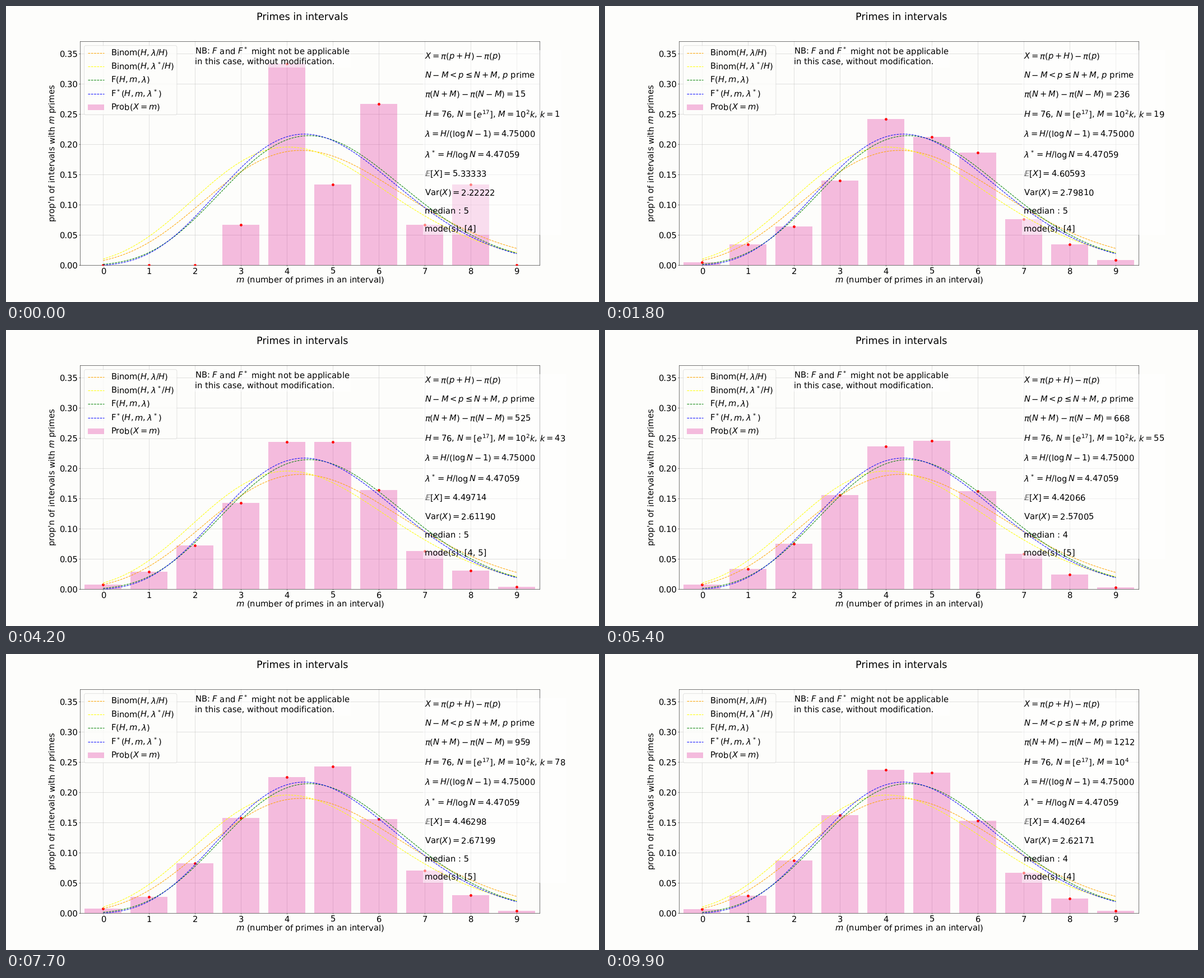
A matplotlib script that plays this animation: 1058x529 px, repeating every 10000 ms.

```python
import math

import numpy as np
import matplotlib.pyplot as plt
from matplotlib.animation import FuncAnimation
from matplotlib.lines import Line2D
from matplotlib.patches import FancyBboxPatch, Rectangle
from matplotlib.transforms import Affine2D

STAGE_W, STAGE_H = 1058, 529
STEPS = 100
PAPER = "#fdfdfb"
PINK = "#e0249a"
U = 23 / 22  # keeps point sizes in step with the 23 pt base font

# --- primes around N -------------------------------------------------------
LOG_N = 17
N = int(math.exp(LOG_N))
H = 76
LAM = H / (LOG_N - 1)
LAM_STAR = H / LOG_N


def primes_between(lo, hi):
    """All primes p with lo <= p <= hi."""
    root = math.isqrt(hi) + 1
    small = np.ones(root + 1, bool)
    small[:2] = False
    window = np.ones(hi - lo + 1, bool)
    for q in range(2, root + 1):
        if small[q]:
            small[q * q::q] = False
            window[-lo % q::q] = False
    return lo + np.flatnonzero(window)


SPAN = 100 * STEPS
PRIMES = primes_between(N - SPAN, N + SPAN + H)
FOLLOWERS = (np.searchsorted(PRIMES, PRIMES + H, "right")
             - np.searchsorted(PRIMES, PRIMES, "right"))


def sample(k):
    """Values of X for the primes within 100k of N."""
    m = 100 * k
    return FOLLOWERS[(PRIMES > N - m) & (PRIMES <= N + m)]


# --- model curves ----------------------------------------------------------
lgamma = np.vectorize(math.lgamma)
C = (math.log(H) + np.euler_gamma + math.log(2 * math.pi) - 1) / (2 * H)


def binom(m, lam):
    p = lam / H
    log_c = math.lgamma(H + 1) - lgamma(m + 1) - lgamma(H - m + 1)
    return np.exp(log_c + m * math.log(p) + (H - m) * math.log(1 - p))


def poisson(m, lam):
    return np.exp(m * math.log(lam) - lam - lgamma(m + 1))


def f_plain(m, lam):
    return poisson(m, lam) * (1 - C * ((m - lam) ** 2 - m))


def f_star(m, lam):
    return poisson(m, lam) * (1 + lam / H * (m - lam) - C * ((m - lam) ** 2 - m))


CURVES = (
    (binom, LAM, "orange", r"$\mathrm{Binom}(H, \lambda/H)$"),
    (binom, LAM_STAR, "yellow", r"$\mathrm{Binom}(H, \lambda^*/H)$"),
    (f_plain, LAM, "green", r"$\mathrm{F}(H, m, \lambda)$"),
    (f_star, LAM_STAR, "blue", r"$\mathrm{F}^*(H, m, \lambda^*)$"),
)

# --- stage -----------------------------------------------------------------
plt.rcParams.update({
    "font.family": "DejaVu Sans",
    "font.size": 23,
    "text.hinting": "none",
    "lines.linewidth": 1.5 * U,
    "lines.markersize": 6 * U,
    "axes.linewidth": 0.8 * U,
    "grid.linewidth": 0.8 * U,
    "xtick.major.size": 3.5 * U, "ytick.major.size": 3.5 * U,
    "xtick.major.pad": 3.5 * U, "ytick.major.pad": 3.5 * U,
    "xtick.major.width": 0.8 * U, "ytick.major.width": 0.8 * U,
})

fig, ax = plt.subplots(figsize=(23, 11.5), dpi=46, facecolor=PAPER)
fig.subplots_adjust(left=0.125, right=0.9, bottom=0.125, top=0.88)
fig.suptitle("Primes in intervals", fontsize=23 * 1.2)
ax.set_facecolor(PAPER)
ax.set_xlim(-0.5, 9.5)
ax.set_ylim(0, 0.37)
ax.set_xticks(range(10))
ax.set_yticks(np.arange(0, 0.36, 0.05))
ax.grid(True, alpha=0.7)

# stage pixels, measured from the top left
PX = Affine2D().scale(1 / STAGE_W, -1 / STAGE_H).translate(0, 1) + fig.transFigure


def box(x0, y0, x1, y1, **style):
    return ax.add_patch(Rectangle((x0, y0), x1 - x0, y1 - y0, transform=PX,
                                  clip_on=False, edgecolor="none", **style))


def veil(x0, y0, x1, y1):
    """Half-transparent white panel behind a block of text."""
    return box(x0, y0, x1, y1, facecolor="white", alpha=0.5, zorder=3)


def write(x, y, text="", **style):
    return ax.text(x, y, text, transform=PX, zorder=6, **style)


write(542.3, 495, "$m$ (number of primes in an interval)", ha="center")
write(88, 263.2, "prop'n of intervals with $m$ primes", ha="center",
      rotation=90, rotation_mode="anchor")

# --- bars and curves -------------------------------------------------------
values = np.arange(10)
bars = ax.bar(values, np.zeros(10), 0.8, color=PINK, alpha=0.3, zorder=2.5)
dots, = ax.plot(values, np.zeros(10), "o", color="red", zorder=2.6)

xs = np.linspace(0, 9, 400)
for curve, lam, color, _ in CURVES:
    ax.plot(xs, curve(xs, lam), "--", color=color, zorder=4)

# --- legend ----------------------------------------------------------------
ax.add_patch(FancyBboxPatch(
    (142.5, 73.7), 159.5, 118, boxstyle="round,pad=2.94", transform=PX,
    facecolor=PAPER, edgecolor="0.8", alpha=0.8, linewidth=U, zorder=5))
ROW = 24.4
for i, (_, _, color, label) in enumerate(CURVES):
    y = 83.6 + ROW * i
    ax.add_line(Line2D([145.5, 174.9], [y, y], color=color, linestyle="--",
                       transform=PX, zorder=6))
    write(186.6, y + 5.1, label)
y = 83.6 + ROW * len(CURVES)
box(145.5, y - 5.1, 174.9, y + 5.1, facecolor=PINK, alpha=0.3, zorder=6)
write(186.6, y + 5.1, r"$\mathrm{Prob}(X = m)$")

# --- notes -----------------------------------------------------------------
veil(334.4, 70.5, 615, 109.5)
write(337.3, 85.5, "NB: $F$ and $F^*$ might not be applicable")
write(337.3, 104, "in this case, without modification.")

PANEL_X = 744.4
panel = veil(PANEL_X, 79, 1000, 409)
BASELINES = (95, 129, 163, 199, 234, 271, 305, 339, 371, 403)
rows = [write(747.3, y) for y in BASELINES]
rows[0].set_text(r"$X = \pi(p + H) - \pi(p)$")
rows[1].set_text(r"$N - M < p \leq N + M$, $p$ prime")
rows[4].set_text(rf"$\lambda = H/(\log N - 1) = {LAM:.5f}$")
rows[5].set_text(rf"$\lambda^* = H/\log N = {LAM_STAR:.5f}$")


def update(i):
    k = i + 1
    x = sample(k)
    counts = np.bincount(x, minlength=10)
    props = counts[:10] / len(x)
    for bar, p in zip(bars, props):
        bar.set_height(p)
    dots.set_ydata(props)

    size = "$M = 10^4$" if k == STEPS else f"$M = 10^2k$, $k = {k}$"
    modes = np.flatnonzero(counts == counts.max()).tolist()
    rows[2].set_text(rf"$\pi(N + M) - \pi(N - M) = {len(x)}$")
    rows[3].set_text(rf"$H = {H}$, $N = [e^{{{LOG_N}}}]$, {size}")
    rows[6].set_text(rf"$\mathbb{{E}}[X] = {x.mean():.5f}$")
    rows[7].set_text(rf"$\mathrm{{Var}}(X) = {x.var():.5f}$")
    rows[8].set_text(f"median : {np.median(x):g}")
    rows[9].set_text(f"mode(s): {modes}")

    right = 948 if k == STEPS else 991 if k < 10 else 1000
    panel.set_width(right - PANEL_X)
    return [*bars, dots, panel, *rows]


anim = FuncAnimation(fig, update, frames=STEPS, interval=100,
                     init_func=lambda: update(0), repeat=True, repeat_delay=0)
plt.show()
```
